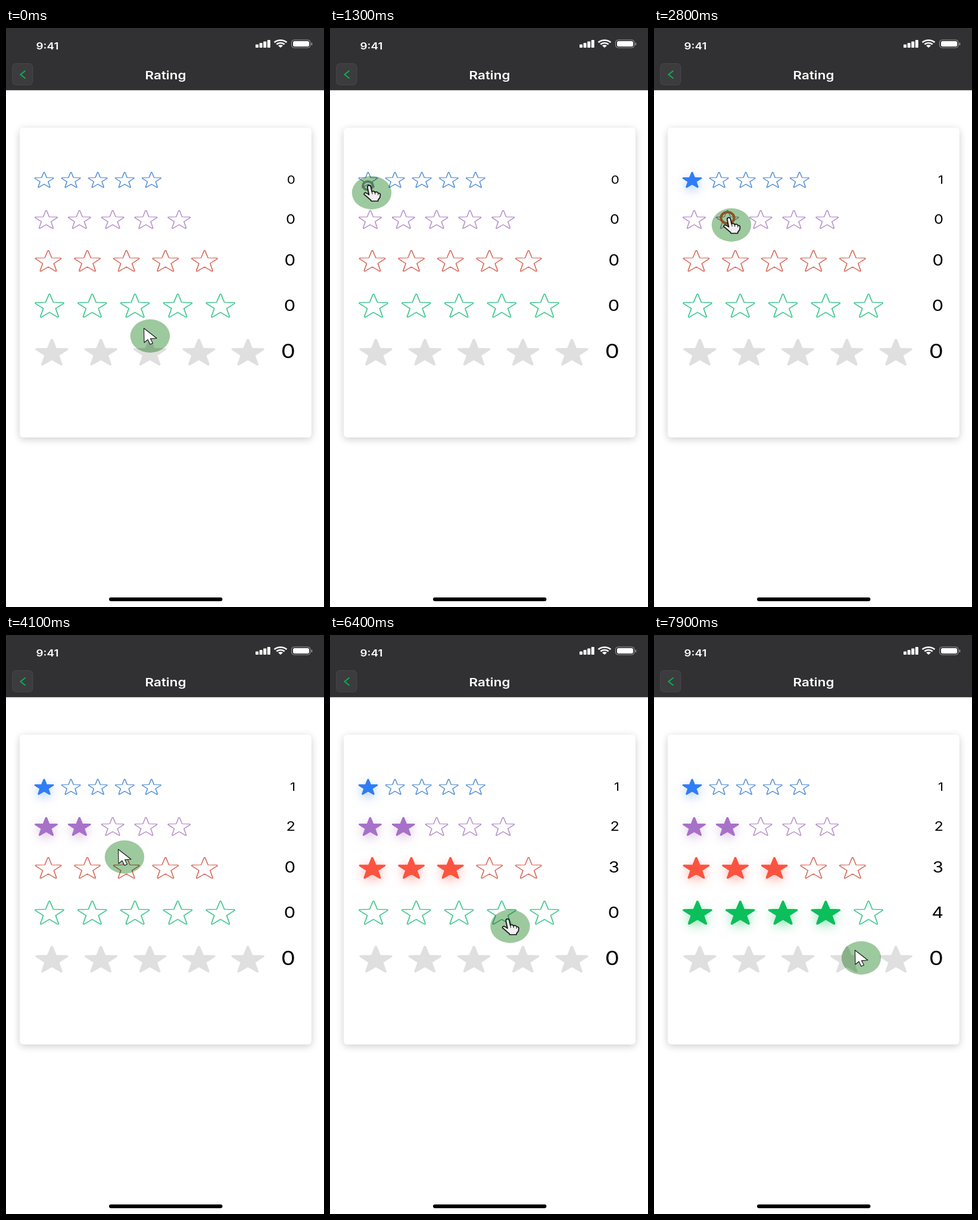
Recreate the animation shown at these times as an HTML page with a canvas. Size 534x970 px, loop 8 s.

```html
<!DOCTYPE html>
<html lang="en">
<head>
<meta charset="utf-8">
<title>Rating</title>
<style>
html, body { margin: 0; width: 100%; height: 100%; overflow: hidden; background: #fff; }
canvas { display: block; width: 534px; height: 970px; }
</style>
</head>
<body>
<canvas id="stage" width="534" height="970"></canvas>
<script>
const ctx = document.getElementById('stage').getContext('2d');
const LOOP = 8000, STEP = 100;
const WIDE = 1.18; // the whole screen is drawn anamorphically wide
const FONT = 'Inter, "Open Sans", sans-serif';

// x, y: centre of the first star; r: radius; gap: star spacing; size, base: counter text
const rows = [
  { x: 64, y: 255.6, r: 15.2, gap: 45.1, line: '#558fd6', fill: '#2f7df6', glow: '47,125,246', lw: 1.3, size: 19, base: 261, score: 1, click: 1200 },
  { x: 67.5, y: 322.2, r: 18.1, gap: 55.8, line: '#b58cc8', fill: '#a871c9', glow: '168,113,201', lw: 1.3, size: 21.5, base: 328, score: 2, click: 2600 },
  { x: 71, y: 391.9, r: 20.9, gap: 65.6, line: '#d96a5c', fill: '#fc5340', glow: '252,83,64', lw: 1.4, size: 25, base: 398, score: 3, click: 4800 },
  { x: 73, y: 467.1, r: 23.2, gap: 71.8, line: '#43c890', fill: '#0bbf5b', glow: '11,191,91', lw: 1.5, size: 26, base: 473.5, score: 4, click: 6700 },
  { x: 77, y: 545.2, r: 26, gap: 82.3, line: '#e0dfdf', lw: 1.4, size: 32.5, base: 553, score: 0, click: Infinity }
];
const FILL_DELAY = 400, RING_TIME = 500;

const smooth = p => p * p * (3 - 2 * p);
const easeOut = p => 1 - (1 - p) * (1 - p);
const linear = p => p;

// time, x, y, easing towards this point, optional bend
const path = [
  [0, 242, 516],
  [900, 70, 276, smooth, [275, 400]],
  [1800, 70, 276, linear],
  [2300, 131, 316, smooth],
  [2400, 131, 316, linear],
  [2700, 130, 330, smooth],
  [3800, 130, 330, linear],
  [4100, 199, 372, linear],
  [4600, 220, 406, easeOut],
  [5700, 220, 406, linear],
  [6200, 312, 489, smooth],
  [6400, 302.5, 488, smooth],
  [7600, 302.5, 488, linear],
  [7900, 348, 541, linear]
];
const handSpans = [[900, 1700], [2300, 3100], [4600, 5300], [6300, 7200]];

function pointerAt(t) {
  const i = path.findIndex(k => k[0] > t);
  if (i < 0) return path[path.length - 1].slice(1, 3);
  const [t0, x0, y0] = path[i - 1], [t1, x1, y1, ease, bend] = path[i];
  const p = ease((t - t0) / (t1 - t0)), q = 1 - p;
  const mix = (a, b, c) => bend ? q * q * a + 2 * q * p * c + p * p * b : q * a + p * b;
  return [mix(x0, x1, bend && bend[0]), mix(y0, y1, bend && bend[1])];
}

function box(x, y, w, h, r, color) {
  ctx.beginPath();
  ctx.roundRect(x, y, w, h, r);
  ctx.fillStyle = color;
  ctx.fill();
}

function text(str, x, y, size, weight, align, color) {
  ctx.save();
  ctx.translate(x, y);
  ctx.scale(WIDE, 1);
  ctx.font = `${weight} ${size}px ${FONT}`;
  ctx.textAlign = align;
  ctx.fillStyle = color;
  ctx.fillText(str, 0, 0);
  ctx.restore();
}

function starPath(r) {
  const pts = Array.from({ length: 10 }, (_, i) => {
    const a = -Math.PI / 2 + i * Math.PI / 5, d = i % 2 ? r * 0.4 : r;
    return [Math.cos(a) * d, Math.sin(a) * d];
  });
  ctx.beginPath();
  ctx.moveTo(...pts[9]);
  for (let i = 0; i < 10; i += 2) {
    ctx.arcTo(...pts[i], ...pts[i + 1], r * 0.04);
    ctx.lineTo(...pts[i + 1]);
  }
  ctx.closePath();
}

function star(x, row, on) {
  ctx.save();
  ctx.translate(x, row.y);
  ctx.scale(WIDE, 1);
  starPath(row.r);
  ctx.lineJoin = 'round';
  ctx.lineWidth = row.lw;
  if (on || !row.fill) {
    ctx.fillStyle = ctx.strokeStyle = on ? row.fill : row.line;
    ctx.stroke();
    if (on) {
      ctx.shadowColor = `rgba(${row.glow},.45)`;
      ctx.shadowBlur = 17;
      ctx.shadowOffsetY = 6;
    }
    ctx.fill();
  } else {
    ctx.strokeStyle = row.line;
    ctx.stroke();
  }
  ctx.restore();
}

function statusBar() {
  text('9:41', 50.5, 36, 16, 600, 'left', '#fff');
  [5.5, 8, 10.5, 13].forEach((h, i) => box(419 + i * 6.6, 33 - h, 5, h, 1, '#fff'));

  ctx.save();
  ctx.translate(461, 33);
  ctx.scale(WIDE, 1);
  ctx.strokeStyle = ctx.fillStyle = '#fff';
  ctx.lineWidth = 2.5;
  [8, 12.4].forEach(r => {
    ctx.beginPath();
    ctx.arc(0, 0, r, -Math.PI * 0.75, -Math.PI * 0.25);
    ctx.stroke();
  });
  ctx.beginPath();
  ctx.moveTo(0, 0);
  ctx.arc(0, 0, 4.8, -Math.PI * 0.75, -Math.PI * 0.25);
  ctx.fill();
  ctx.restore();

  ctx.beginPath();
  ctx.roundRect(479.5, 20, 31.5, 13, 4);
  ctx.strokeStyle = '#98989a';
  ctx.lineWidth = 1;
  ctx.stroke();
  box(482, 22, 27, 9, 2.5, '#fff');
  box(512.5, 24.5, 1.7, 4.5, 1, '#98989a');
}

function header() {
  box(0, 104, 534, 1, 0, '#c4c2c2');
  box(0, 0, 534, 104, 0, '#313133');
  statusBar();
  box(10, 59, 35.5, 37, 7, '#464648');
  box(11, 60, 33.5, 35, 6, '#3c3c3e');
  ctx.beginPath();
  ctx.moveTo(32.5, 71.5);
  ctx.lineTo(24.5, 78);
  ctx.lineTo(32.5, 84.5);
  ctx.strokeStyle = '#0bb04e';
  ctx.lineWidth = 2;
  ctx.lineJoin = 'miter';
  ctx.stroke();
  text('Rating', 268, 86, 19, 600, 'center', '#fff');
}

function card() {
  ctx.save();
  ctx.shadowColor = 'rgba(0,0,0,.2)';
  ctx.shadowBlur = 13;
  ctx.shadowOffsetY = 3;
  box(23, 167, 490, 519, 6, '#fff');
  ctx.restore();
}

function ring(t, x, y) {
  const row = rows.find(r => t >= r.click && t < r.click + RING_TIME);
  if (!row) return;
  const age = (t - row.click) / 100;
  const warm = Math.min(1, Math.max(0, age - 1));
  const mix = (a, b) => Math.round(a + (b - a) * warm);
  const r = 4.6 + 2.4 * age;
  ctx.beginPath();
  ctx.ellipse(x - 6.5, y - 12, r * WIDE, r, 0, 0, Math.PI * 2);
  ctx.strokeStyle = `rgb(${mix(150, 226)},${mix(155, 105)},${mix(150, 58)})`;
  ctx.globalAlpha = age <= 2 ? 1 : 1 - (age - 2) * 0.35;
  ctx.lineWidth = 4;
  ctx.stroke();
  ctx.globalAlpha = 1;
}

const hand = new Path2D('M-3.6 2C-4-2 1.2-2.6 2 1L3.8 9.3C5.5 7.6 8.5 8.2 9 10.5' +
  'C11 8.8 14 9.8 14.3 12C16.5 11.2 18.2 12.4 18 14.8L17.4 19L14.5 22.6L14 25' +
  'L3 25L1.5 22.8L-7 15.6L-9.4 13.6C-9.6 10.4-5.6 10-1 14.5Z');
const arrow = new Path2D('M0 0L.6 24L6.6 19L10.5 27L15 25L11 17.6L21.5 16.8Z');
const knuckles = new Path2D('M4 9.5L4.6 13.5M9 11L9.4 14M14.3 12.5L14.2 15');

function pointer(t) {
  const [x, y] = pointerAt(t);
  ring(t, x, y);
  ctx.save();
  ctx.globalCompositeOperation = 'multiply';
  ctx.beginPath();
  ctx.ellipse(x, y, 33.2, 28, 0, 0, Math.PI * 2);
  ctx.fillStyle = '#9dc99e';
  ctx.fill();
  ctx.restore();

  const pressing = handSpans.some(([a, b]) => t >= a && t < b);
  const shape = pressing ? hand : arrow;
  ctx.save();
  ctx.translate(x + (pressing ? -3.5 : -10.5), y + (pressing ? -11 : -13));
  ctx.lineJoin = 'round';
  ctx.fillStyle = pressing ? '#f0f0f0' : '#fff';
  ctx.strokeStyle = '#111';
  ctx.lineWidth = pressing ? 1.7 : 1.1;
  ctx.fill(shape);
  ctx.stroke(shape);
  if (pressing) {
    ctx.lineWidth = 1;
    ctx.stroke(knuckles);
  }
  ctx.restore();
}

function draw(t) {
  box(0, 0, 534, 970, 0, '#fff');
  card();
  header();
  rows.forEach(row => {
    const score = t >= row.click + FILL_DELAY ? row.score : 0;
    for (let i = 0; i < 5; i++) star(row.x + i * row.gap, row, i < score);
    text(score, 486, row.base, row.size, 400, 'right', '#000');
  });
  box(173, 954, 190.5, 6.2, 3.1, '#000');
  pointer(t);
}

const start = performance.now();
function tick() {
  const t = (performance.now() - start) % LOOP;
  draw(Math.floor(t / STEP) * STEP);
  requestAnimationFrame(tick);
}
tick();
</script>
</body>
</html>
```
